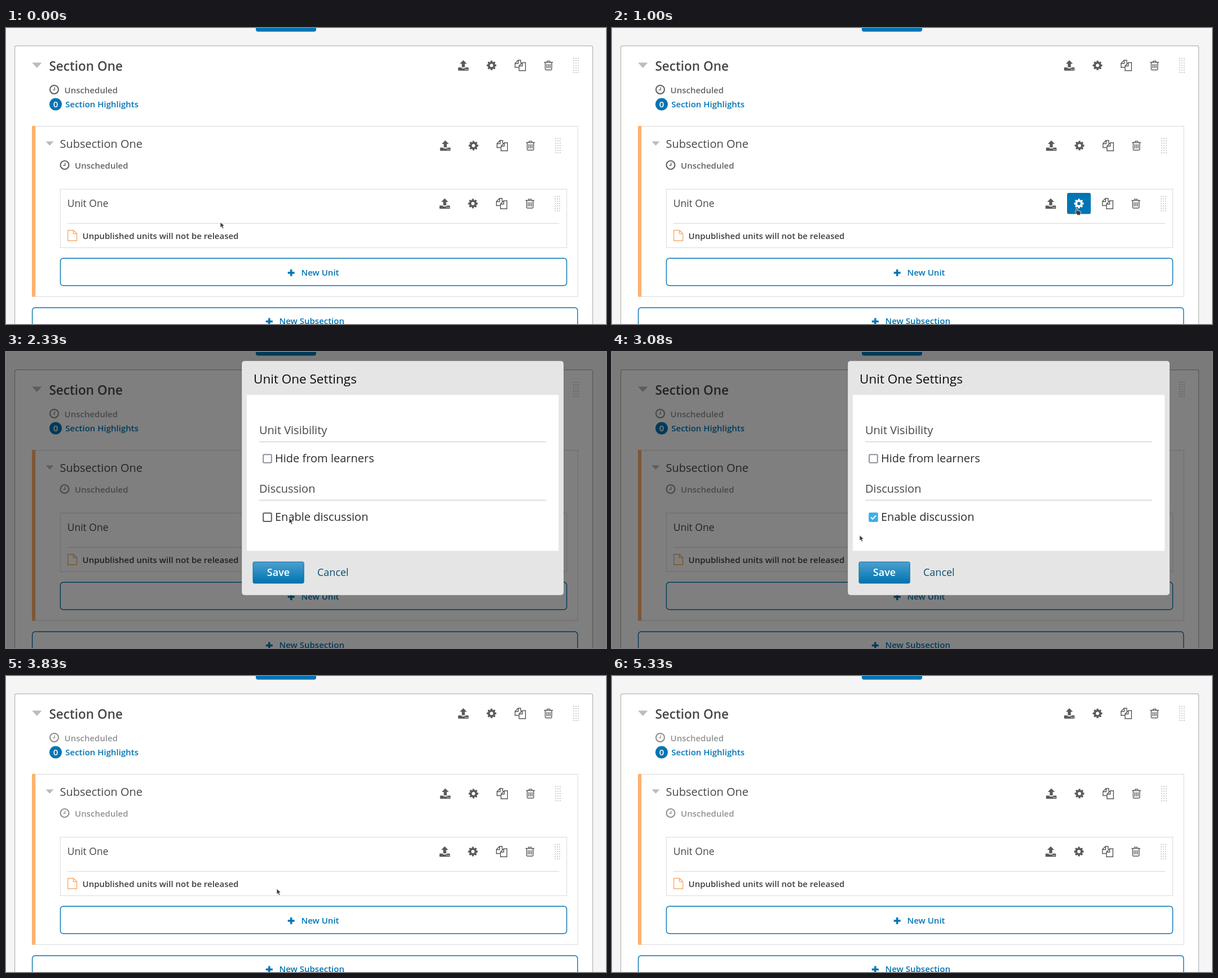
Animation of 1064 by 526 pixels, one loop 5.83 s. Source, as an HTML page:

```html
<!DOCTYPE html>
<html lang="en">
<head>
<meta charset="utf-8">
<title>Unit settings</title>
<style>
  html, body { margin: 0; width: 100%; height: 100%; overflow: hidden; background: #f5f5f5; }
  svg { display: block; width: 100vw; height: 100vh; }
  text { font-family: "Open Sans", "Noto Sans", sans-serif; font-size: 15px; fill: #474747; }
  .semi { font-weight: 600; }
  .link { fill: #0075b4; }
  .md { font-size: 20px; }
  .lg { font-size: 22.5px; }
  .btn { font-size: 18px; }
  .icon { color: #5a5a5a; }
  .icon.on { color: #fff; }
  .icon .bg { fill: none; }
  .icon.on .bg { fill: #0075b4; }
  .solid { fill: currentColor; }
  .line { fill: none; stroke: currentColor; stroke-width: 1.45; }
  .outline { fill: #fff; stroke: #0075b4; stroke-width: 1.4; }
  .box { fill: #fff; stroke: #dfdfdf; stroke-width: 1.25; }
  .status { color: #646464; }
  .status text { fill: #646464; }
</style>
</head>
<body>
<svg viewBox="0 0 1064 526" preserveAspectRatio="none">
  <defs>
    <linearGradient id="blue" x2="0" y2="1">
      <stop stop-color="#4ca0cf"/><stop offset="1" stop-color="#0073b1"/>
    </linearGradient>
    <linearGradient id="darkBlue" x2="0" y2="1">
      <stop stop-color="#4a88ae"/><stop offset="1" stop-color="#07507c"/>
    </linearGradient>
    <g id="upload">
      <path class="solid" d="M0-9.3 6.2-3H2.7V3.2H-2.7V-3H-6.2Z"/>
      <path class="solid" d="M-9.3 4.4q0-1 1-1H-4q.8 1.8 2.6 1.8h2.8q1.8 0 2.6-1.8H8.3q1 0 1 1V8.3q0 1-1 1H-8.3q-1 0-1-1Z"/>
      <path d="M3.2 7h1.4M6.1 7h1.4" stroke="#fff" stroke-width="1.3"/>
    </g>
    <path id="gear" class="solid" fill-rule="evenodd"/>
    <path id="copy" class="line" d="M-2.2 3.5H-9.3V-3.8L-3.8-9.3H.7V-4M-3.57-9V-3.57H-9M-2.15 9.3H9.3V-5H3.57L-2.15 .9ZM3.57-5V.9H-2"/>
    <path id="trash" class="line" d="M-7.9-5.6H7.9M-3.1-5.6-2.2-7.9H2.2L3.1-5.6M-5.7-5.6V6.2Q-5.7 7.9-4.6 7.9H4.6Q5.7 7.9 5.7 6.2V-5.6M-2.9-2.4V5M0-2.4V5M2.9-2.4V5"/>
    <g id="clock">
      <circle class="line" r="7.5" style="stroke-width:2.2"/>
      <path class="line" d="M.7-4V.8H-2.6"/>
    </g>
    <path id="plus" fill="#0075b4" d="M-1.7-6H1.7V-1.7H6V1.7H1.7V6H-1.7V1.7H-6V-1.7H-1.7Z"/>
  </defs>

  <rect width="1064" height="526" fill="#f5f5f5"/>
  <rect x="443" y="-30" width="107" height="36.5" rx="4" fill="#0075b4"/>
  <rect x="15.6" y="31.6" width="1024.8" height="520" rx="3" fill="#fff" stroke="#b4b4b4" stroke-width="1.25"/>

  <path d="M47 62H62.500L54.700 70.500Z" fill="#bcbcbc" stroke="#bcbcbc" stroke-linejoin="round"/>
  <text class="semi lg" x="76.500" y="76">Section One</text>
  <g class="status">
    <use href="#clock" x="85.500" y="109.300"/>
    <text class="semi" x="103.500" y="116">Unscheduled</text>
  </g>
  <circle cx="88" cy="135.500" r="11" fill="#0075b4"/>
  <text class="semi" x="88" y="141" text-anchor="middle" style="fill:#fff">0</text>
  <text class="semi link" x="105.300" y="141">Section Highlights</text>

  <rect class="box" x="46.600" y="174.600" width="967.400" height="302.500"/>
  <rect x="46" y="174" width="6.200" height="303.500" fill="#ffb06e"/>
  <path d="M71.500 202H83.500L77.500 208.500Z" fill="#bcbcbc" stroke="#bcbcbc" stroke-linejoin="round"/>
  <text class="md" x="95.500" y="213">Subsection One</text>
  <g class="status">
    <use href="#clock" x="104" y="243.500"/>
    <text class="semi" x="122" y="250">Unscheduled</text>
  </g>

  <rect class="box" x="96.400" y="286.400" width="898" height="104"/>
  <text x="108.700" y="318" style="font-size:17.500px">Unit One</text>
  <path d="M109 347.400H981" stroke="#dcdcdc" stroke-width="1.250"/>
  <path d="M109.700 359.500H119.500L125.600 365.600V378H109.700ZM119.500 359.500V365.600H125.600" fill="none" stroke="#f8ab69" stroke-width="1.400"/>
  <text class="semi" x="135.500" y="375.300" style="fill:#3f3f3f">Unpublished units will not be released</text>

  <rect class="outline" x="96.400" y="409.200" width="898" height="48.600" rx="5"/>
  <use href="#plus" x="505.700" y="435"/>
  <text class="semi link" x="523.500" y="439.800">New Unit</text>
  <rect class="outline" x="46.600" y="497" width="967" height="60" rx="5"/>
  <use href="#plus" x="466.800" y="521.500"/>
  <text class="semi link" x="484.500" y="526.300">New Subsection</text>

  <g id="actions"></g>

  <g id="modal">
    <rect width="1064" height="526" opacity=".5"/>
    <rect x="418" y="15.700" width="571" height="416.500" rx="5" fill="#e5e5e5" stroke="#000" stroke-opacity=".15"/>
    <rect x="427" y="76.300" width="553" height="277" fill="#fff"/>
    <path d="M449 159.500H958M449 263.500H958" stroke="#e3e3e3" stroke-width="2.300"/>
    <text class="lg" x="439" y="56" style="fill:#0c0c0c">Unit One Settings</text>
    <text class="md" x="449" y="146">Unit Visibility</text>
    <text class="md" x="477" y="196" style="fill:#2c2c2c">Hide from learners</text>
    <text class="md" x="449" y="250">Discussion</text>
    <text class="md" x="477" y="300" style="fill:#2c2c2c">Enable discussion</text>
    <rect x="456.200" y="182.200" width="14.600" height="14.600" rx="1.500" fill="#fff" stroke="#8f8f9d" stroke-width="2"/>
    <rect id="check" x="456.200" y="286.300" width="14.600" height="14.600" rx="1.500" stroke-width="2"/>
    <path id="tick" d="M459.300 293.700 462.300 296.800 468 290.500" fill="none" stroke="#fff" stroke-width="2"/>
    <rect id="save" x="438" y="373" width="90.200" height="38" rx="2.500"/>
    <text class="btn semi" x="483" y="398" text-anchor="middle" style="fill:#fff">Save</text>
    <text class="btn" x="552" y="398" style="fill:#0a4e73">Cancel</text>
  </g>

  <g id="cursor" fill="#3c3c3f" stroke="#fff" stroke-width=".8" stroke-linejoin="round">
    <path id="arrow" d="M0 0V9.800L2.300 7.900 4.100 11.600 6 10.700 4.400 7.100 7.300 6.400Z"/>
    <path id="hand" d="M1 .8Q2.200-.4 3.300 .9V4.300L8 5.200Q9.300 5.500 9.200 7L8.700 10V12.700H2.700V11L-.6 7.600Q-1 6.200 .4 6L1 6.600Z"/>
  </g>
</svg>
<script>
const LOOP = 5830, FRAME = 1000 / 12;
const $ = id => document.getElementById(id);

function gearPath() {
  let d = '';
  for (let i = 0; i < 8; i++) {
    [[-.3, 6.4], [-.17, 8.6], [.17, 8.6], [.3, 6.4]].forEach(([da, r]) => {
      const a = i * Math.PI / 4 + da;
      d += `${d ? 'L' : 'M'}${(r * Math.cos(a)).toFixed(2)} ${(r * Math.sin(a)).toFixed(2)}`;
    });
  }
  return d + 'ZM-2.9 0a2.9 2.9 0 1 0 5.800 0a2.900 2.900 0 1 0-5.800 0Z';
}

function actionRow(x, y) {
  const icons = ['upload', 'gear', 'copy', 'trash'].map((name, i) => {
    const left = x + [0, 50, 101, 151][i];
    return `<g class="icon" transform="translate(${left} ${y})">
      <rect class="bg" x="-21" y="-19" width="42" height="37.500" rx="3"/><use href="#${name}"/></g>`;
  });
  let dots = '';
  for (let r = 0; r < 7; r++)
    for (let c = 0; c < 3; c++) dots += `M${x + 195 + c * 3.9} ${y - 13.5 + r * 4.2}h1.700v1.700h-1.700z`;
  return icons.join('') + `<path d="${dots}" fill="#bdbdbd"/>`;
}

$('gear').setAttribute('d', gearPath());
$('actions').innerHTML = actionRow(811, 66.5) + actionRow(779, 209) + actionRow(778, 312);
const unitIcons = [...document.querySelectorAll('.icon')].slice(8);
const statuses = document.querySelectorAll('.status');

// Pointer stops: time, x, y
const pointer = [
  [250, 380, 345], [830, 810, 322], [1000, 822, 320], [1250, 823, 320],
  [1830, 537, 269], [2080, 507, 281], [2170, 507, 281], [2330, 502, 295],
  [2670, 502, 295], [3170, 434, 328], [3330, 439, 338], [3500, 476, 380],
  [3750, 476, 380], [3830, 480, 378], [4250, 530, 352], [4750, 530, 352],
  [5080, 607, -20]
];

const smooth = u => u * u * (3 - 2 * u);
const ramp = (t, a, b) => smooth(Math.min(1, Math.max(0, (t - a) / (b - a))));
const within = (t, a, b) => t >= a && t < b;
const show = (id, on) => $(id).setAttribute('visibility', on ? 'inherit' : 'hidden');

function pointerAt(t) {
  const i = pointer.findIndex(p => p[0] > t);
  if (i === 0) return pointer[0].slice(1);
  if (i < 0) return pointer[pointer.length - 1].slice(1);
  const [t0, x0, y0] = pointer[i - 1], [t1, x1, y1] = pointer[i];
  const u = ramp(t, t0, t1);
  return [x0 + (x1 - x0) * u, y0 + (y1 - y0) * u];
}

function draw(time) {
  const t = Math.floor((time + 4) / FRAME) * FRAME + 4;
  const [x, y] = pointerAt(t);
  $('cursor').setAttribute('transform', `translate(${x.toFixed(1)} ${y.toFixed(1)})`);
  const hand = within(t, 750, 1250);
  show('hand', hand);
  show('arrow', !hand);

  unitIcons[0].classList.toggle('on', within(t, 750, 920));
  unitIcons[1].classList.toggle('on', within(t, 920, 1250));

  const dim = ramp(t, 1250, 1500) - ramp(t, 3830, 4170) + ramp(t, 5000, 5330);
  statuses.forEach(s => s.setAttribute('opacity', 1 - .3 * dim));

  show('modal', within(t, 1250, 3830));
  const checked = t >= 2580, hover = within(t, 2250, 2750);
  $('check').setAttribute('fill', checked ? '#3daee9' : '#fff');
  $('check').setAttribute('stroke', checked ? '#3daee9' : hover ? '#5b5b66' : '#8f8f9d');
  show('tick', checked);
  const onSave = t >= 3500;
  $('save').setAttribute('fill', onSave ? 'url(#darkBlue)' : 'url(#blue)');
  $('save').setAttribute('stroke', onSave ? '#0b5f94' : '#0a6ea8');
}

function tick() {
  draw(performance.now() % LOOP);
  requestAnimationFrame(tick);
}
tick();
</script>
</body>
</html>
```
